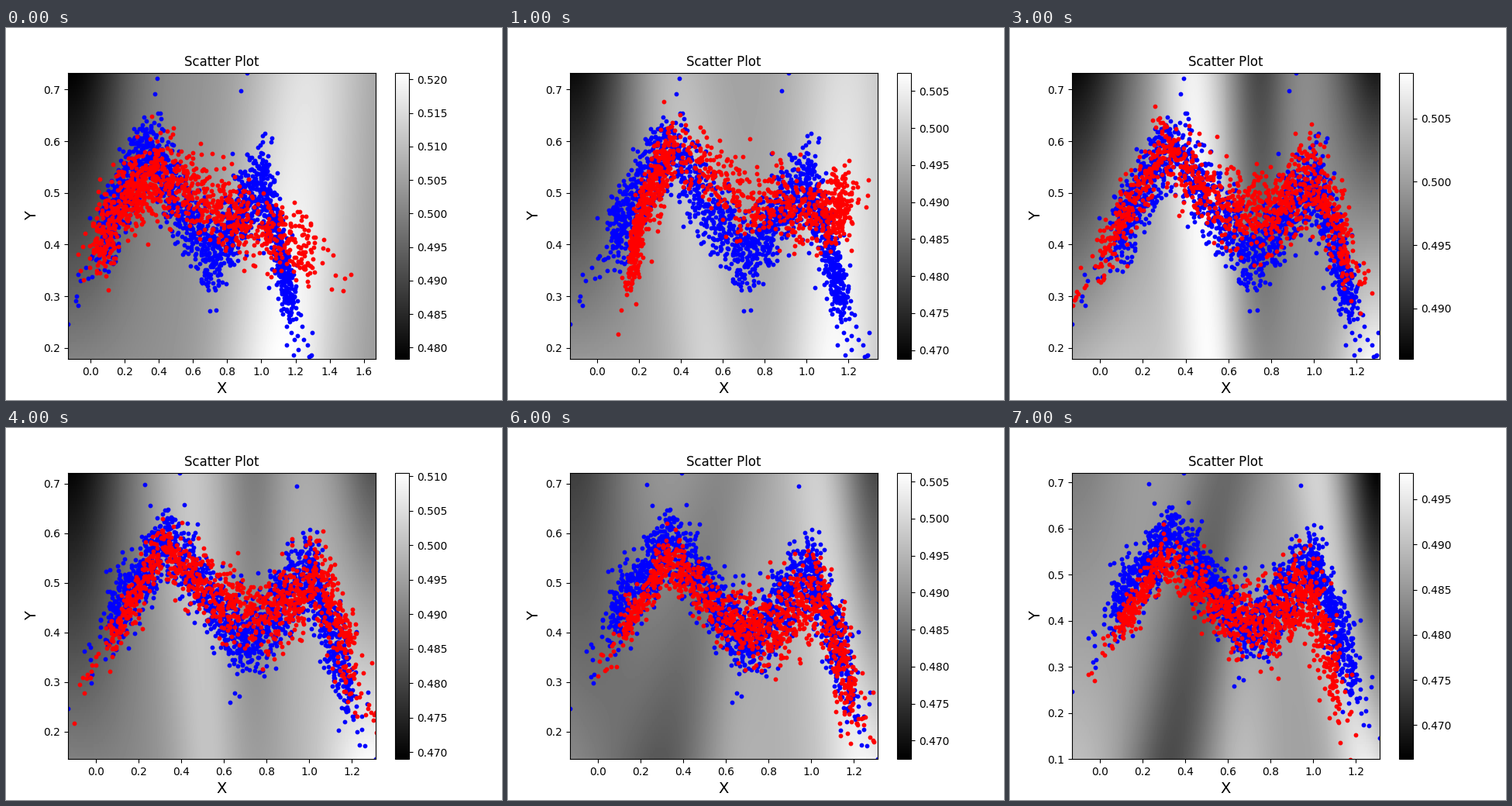
Recreate the animation shown at these times as a matplotlib script. Size 640 by 480 pixels, loop 8 s.

```python
import matplotlib.pyplot as plt
import numpy as np
from matplotlib.animation import FuncAnimation

XMIN = -0.131
ROWS, COLS = 100, 400


def cloud(seed, count, x, y, spread, jitter=0.01):
    """Noisy points along a key-point path, an equal share per segment."""
    rng = np.random.default_rng(seed)
    keys = np.column_stack([x, y])
    last = len(keys) - 1
    t = rng.uniform(0, last, count)
    body = np.column_stack([np.interp(t, range(last + 1), k) for k in keys.T])
    # A few points thin out beyond both ends.
    beyond = rng.beta(1, 3, (15, 1))
    head = keys[0] + (keys[0] - keys[1]) * beyond
    tail = keys[-1] + (keys[-1] - keys[-2]) * beyond
    points = np.vstack([body, head, tail])
    share = np.concatenate([t / last, np.zeros(15), np.ones(15)])
    sigma = spread[0] + (spread[1] - spread[0]) * share
    points[:, 0] += rng.normal(0, jitter, len(points))
    points[:, 1] += rng.normal(0, sigma)
    return points


def shade(base, ridges):
    """Grey 0..1: leaning ridges whose strength fades from bottom to top."""
    u = np.linspace(0, 1, COLS)
    v = np.linspace(1, 0, ROWS)[:, None]
    grey = np.full((ROWS, COLS), float(base))
    for centre, lean, width, bottom, top in ridges:
        bump = np.exp(-((u - centre - lean * v) / width) ** 2)
        grey += bump * (bottom + (top - bottom) * v)
    return np.clip(grey / 255, 0, 1)


def scene(xmax, ylim, clim, x, y, spread, grey, line=None):
    return dict(xmax=xmax, ylim=ylim, clim=clim, x=np.array(x), y=np.array(y),
                spread=np.array(spread), grey=grey, line=line)


def between(a, b, xmax, ylim, clim):
    mean = [(a[k] + b[k]) / 2 for k in ("x", "y", "spread", "grey")]
    return scene(xmax, ylim, clim, *mean)


def real_cloud(seed, outliers):
    points = cloud(seed, 1600, (.06, .34, .7, 1.0, 1.19),
                   (.42, .595, .37, .53, .28), (.035, .042), jitter=0.018)
    return np.vstack([points, outliers])


real_a = real_cloud(3, [(XMIN, .247), (.916, .7326), (.39, .721), (.882, .697),
                        (.7, .272), (1.29, .185)])
real_b = real_cloud(8, [(XMIN, .246), (.393, .7217), (.23, .698), (.94, .694),
                        (.63, .259), (1.31, .1455)])

drift = scene(
    1.668, (.1785, .7326), (.4783, .5210),
    (.03, .22, .4, .62, .9, 1.3), (.4, .495, .535, .5, .445, .39), (.042, .035),
    shade(145, [(0, 0, .2, -15, -145), (.7, .08, .2, 110, 80)]))

flat = scene(
    1.34, (.1785, .7326), (.46878, .5075),
    (.16, .22, .36, .75, 1.08, 1.2), (.36, .48, .585, .48, .455, .475), (.03, .04),
    shade(160, [(0, 0, .2, -10, -150), (.45, -.12, .13, 50, 35),
                (.86, .04, .17, 90, 60)]))

low = scene(
    1.289, (.1735, .7324), (.46875, .4972),
    (.12, .24, .37, .7, 1.0, 1.14), (.32, .465, .485, .39, .385, .27), (.035, .06),
    shade(130, [(.05, 0, .3, 125, -75), (.45, -.08, .13, 95, 75),
                (.62, 0, .1, -10, -75), (1, 0, .15, 10, -115)]),
    line=.7235)

fit = scene(
    1.307, (.1785, .7326), (.4860, .50862),
    (-.01, .28, .56, .8, 1.0, 1.17), (.36, .585, .48, .46, .535, .37), (.03, .045),
    shade(150, [(0, 0, .2, 0, -150), (.2, 0, .25, 45, 15), (.45, -.06, .11, 85, 85),
                (.61, 0, .09, -20, -80), (1, 0, .14, 100, -125)]))

shifted = scene(
    1.37, (.1409, .7217), (.46626, .51715),
    (.135, .35, .62, .85, 1.08, 1.28), (.415, .56, .445, .41, .485, .27), (.015, .055),
    shade(160, [(0, 0, .2, 0, -160), (.12, 0, .27, -95, 0), (.95, -.1, .25, 95, 45),
                (1, 0, .1, 0, -50)]))

tight = scene(
    1.311, (.0997, .7217), (.46625, .49795),
    (.09, .3, .58, .8, .97, 1.12), (.385, .54, .415, .395, .47, .26), (.018, .06),
    shade(160, [(0, 0, .15, 30, -35), (.32, .18, .13, -85, -55), (.55, 0, .1, 30, 0),
                (.95, -.14, .1, 75, 60), (1, 0, .12, 0, -160)]))

rise = between(fit, shifted, 1.311, (.145, .7217), (.4690, .51055))
settle = between(shifted, tight, 1.311, (.145, .7217), (.4675, .5062))
scenes = [drift, flat, low, fit, rise, shifted, settle, tight]

for i, s in enumerate(scenes):
    low_end, high_end = s["clim"]
    s["real"] = real_a if i < 4 else real_b
    s["fake"] = cloud(20 + i, 1000, s["x"], s["y"], s["spread"])
    s["image"] = low_end + s["grey"] * (high_end - low_end)

fig, ax = plt.subplots(figsize=(6.4, 4.8), dpi=100)
image = ax.imshow(scenes[0]["image"], cmap="gray", aspect="auto",
                  interpolation="nearest")
fig.colorbar(image, ax=ax)
stripe = ax.axhline(0.7, color="white", lw=2.2, zorder=0.5)
dots = dict(s=10, linewidths=1.0)
real = ax.scatter([], [], color="blue", **dots)
fake = ax.scatter([], [], color="red", **dots)
ax.set_title("Scatter Plot")
ax.set_xlabel("X", fontsize=14)
ax.set_ylabel("Y", fontsize=14)


def draw(i):
    s = scenes[i]
    image.set_data(s["image"])
    image.set_clim(*s["clim"])
    image.set_extent((XMIN, s["xmax"], *s["ylim"]))
    ax.set_xlim(XMIN, s["xmax"])
    ax.set_ylim(*s["ylim"])
    real.set_offsets(s["real"])
    fake.set_offsets(s["fake"])
    stripe.set_visible(s["line"] is not None)
    if s["line"] is not None:
        stripe.set_ydata([s["line"]] * 2)
    return image, stripe, real, fake


anim = FuncAnimation(fig, draw, frames=len(scenes), interval=1000, repeat=True)
plt.show()
```
